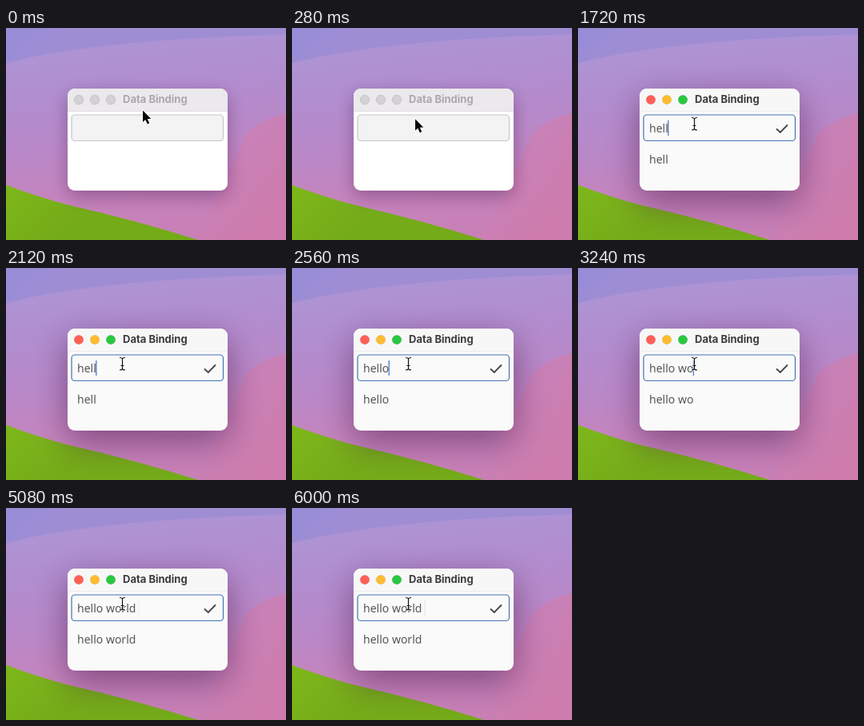
Recreate the animation shown at these times as an HTML page with a canvas. Size 350 px wide and 266 px high, loop 6080 ms.

```html
<!DOCTYPE html>
<html>
<head>
<meta charset="utf-8">
<style>
html, body { margin: 0; width: 100%; height: 100%; overflow: hidden; }
canvas { display: block; }
</style>
</head>
<body>
<canvas id="stage" width="350" height="266"></canvas>
<script>
const c = document.getElementById('stage').getContext('2d');
const LOOP = 6080, ACTIVE = 400, FOCUS = 480, CARET = 680, FADE = 4580;
const MESSAGE = 'hello world ';
const KEYS = [1080, 1320, 1520, 1690, 2160, 2720, 2960, 3160, 3360, 3600, 3880, 4440];
const BODY_FONT = '14px "Noto Sans", sans-serif';

function gradient(x0, y0, x1, y1, ...colors) {
  const g = c.createLinearGradient(x0, y0, x1, y1);
  colors.forEach((col, i) => g.addColorStop(i / (colors.length - 1), col));
  return g;
}

function shape(d, fill, stroke, width = 1) {
  const p = new Path2D(d);
  if (stroke) {
    c.strokeStyle = stroke;
    c.lineWidth = width;
    c.stroke(p);
  }
  if (fill) {
    c.fillStyle = fill;
    c.fill(p);
  }
}

function box(x, y, w, h, r, fill, stroke) {
  c.beginPath();
  c.roundRect(x, y, w, h, r);
  c.fillStyle = fill;
  c.fill();
  if (stroke) {
    c.strokeStyle = stroke;
    c.lineWidth = 1.2;
    c.stroke();
  }
}

function text(s, x, y, font, color) {
  c.font = font;
  c.fillStyle = color;
  c.fillText(s, x, y);
}

function wallpaper() {
  c.fillStyle = gradient(120, 20, 150, 266, '#ae94d4', '#b18dcf', '#b988c8', '#c584bd', '#c880b6');
  c.fillRect(0, 0, 350, 266);
  shape('M0 0H350V8Q110 15 0 44Z', gradient(0, 0, 40, 44, '#968cd8', '#9f8dd4'));
  shape('M350 107Q318 115 300 133L240 266H350Z', gradient(290, 150, 350, 200, '#c881b8', '#cd7cad'));
  shape('M0 197Q40 212 78 222Q165 242 240 266H0Z', gradient(0, 200, 60, 266, '#7eb71b', '#74ab18'));
}

function frame(active) {
  c.save();
  c.shadowColor = active ? 'rgba(65,20,70,.55)' : 'rgba(65,20,70,.4)';
  c.shadowBlur = active ? 44 : 22;
  c.shadowOffsetY = active ? 13 : 7;
  box(77, 76, 200, 128, 9, active ? '#fafafa' : '#fff');
  c.restore();
  box(77, 76, 200, 28.5, [9, 9, 0, 0], active ? '#f8f7f8' : '#ebe9eb');
  c.fillStyle = active ? '#ececec' : '#e0dee0';
  c.fillRect(77, 104, 200, 1);
  ['#fe5f57', '#febc2e', '#28c840'].forEach((col, i) => {
    c.beginPath();
    c.arc(91 + 20 * i, 90, 5.8, 0, 7);
    c.fillStyle = active ? col : '#d3d1d3';
    c.fill();
    c.strokeStyle = active ? 'rgba(0,0,0,.1)' : '#c2c0c2';
    c.lineWidth = .8;
    c.stroke();
  });
  text('Data Binding', 146, 94.3, 'bold 13px Inter, sans-serif', active ? '#3d3b3d' : '#aaa8aa');
}

function form(t) {
  const focused = t >= FOCUS;
  const typed = MESSAGE.slice(0, KEYS.filter(k => t >= k).length);
  box(82, 109, 189.5, 32.5, 4, focused ? '#fafafa' : '#f3f3f3', focused ? '#4672b8' : '#c6c6c6');
  text(typed, 89, 130.6, BODY_FONT, '#565656');
  text(typed, 89, 169.6, BODY_FONT, '#565656');
  if (t >= CARET) {
    const alpha = t < FADE ? 1 : .54 + .46 * Math.cos((t - FADE) / 500 * Math.PI);
    c.globalAlpha = alpha;
    c.fillStyle = '#5682ce';
    c.fillRect(88.3 + c.measureText(typed).width, 116, 1.4, 19);
    c.globalAlpha = 1;
  }
  if (typed) shape('M248 126.5L252.8 131L262 121.5', null, '#444', 1.8);
}

function pointer(t) {
  const p = Math.min(1, Math.max(0, (t - 40) / 400));
  const e = p * p * (3 - 2 * p);
  c.save();
  c.translate(171 - 26 * e, 103.5 + 16.5 * e);
  if (t < FOCUS) {
    shape('M0 0V14.5L3.3 11.5L5.7 17L8.2 16L5.8 10.6H10.3Z', '#000', '#fff', 1.6);
  } else {
    const beam = 'M-3 -7.5Q0 -7.5 0.5 -6Q1 -7.5 4 -7.5M0.5 -6V6.5M-3 8Q0 8 0.5 6.5Q1 8 4 8M-1.5 2.5H2.5';
    shape(beam, null, 'rgba(255,255,255,.8)', 2.6);
    shape(beam, null, '#111', 1.2);
  }
  c.restore();
}

function draw(now) {
  const t = now % LOOP;
  wallpaper();
  frame(t >= ACTIVE);
  form(t);
  pointer(t);
  requestAnimationFrame(draw);
}
requestAnimationFrame(draw);
</script>
</body>
</html>
```
